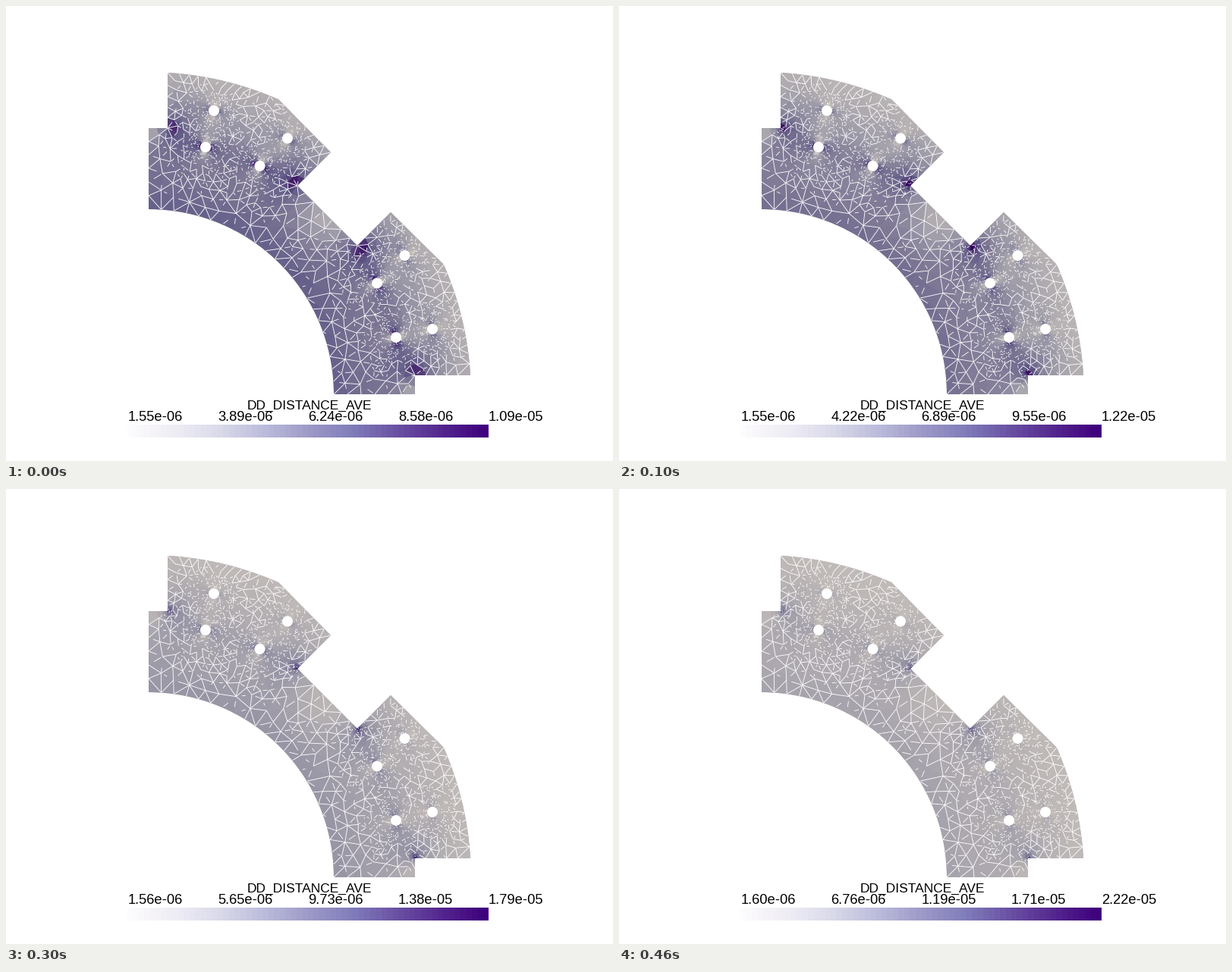
Write a matplotlib script that moves like this. It is 800x600 px and loops after 0.5 s.

```python
import numpy as np
import matplotlib.pyplot as plt
from matplotlib import colormaps
from matplotlib.animation import FuncAnimation
from matplotlib.collections import LineCollection, PolyCollection
from matplotlib.patches import Circle, PathPatch
from matplotlib.path import Path
from matplotlib.tri import Triangulation

W, H, DPI = 800, 600, 100
PX = 72 / DPI
CENTER = np.array([188.0, 512.0])
R_IN, R_OUT, R_HOLE = 244, 424.8, 7
RANGES = [(1.55, 10.925), (1.55, 12.222), (1.55, 14.925), (1.56, 17.905), (1.60, 22.24)]
SHADE = np.array([0.785, 0.766, 0.74])
CMAP = colormaps["Purples"].resampled(64)
rng = np.random.default_rng(5)

# Offsets from the centre (right, up) for one half; the other is its mirror.
HOLES = np.array([(86, 374), (183, 337.5), (75, 326), (146.5, 301)])
NOTCHES = np.array([(25, 351), (196, 275)])
PLUMES = np.array([(0.91, 0.41), (-0.41, 0.91)])
RING_R = 14


def to_screen(p):
    return CENTER + np.asarray(p) * (1, -1)


def both(p):
    return np.vstack([to_screen(p), to_screen(p[:, ::-1])])


hole_xy = both(HOLES)
notch_xy = both(NOTCHES)
ring_start = np.radians([-90, 45, 90, -45])


def arc(r, a, b):
    t = np.radians(np.linspace(a, b, 60))
    return to_screen(np.column_stack([r * np.cos(t), r * np.sin(t)]))


def line(a, b):
    return np.linspace(a, b, 60)


def make_pieces():
    lo = np.degrees(np.arctan2(25, 424))
    hi = np.degrees(np.arctan2(171, 389))
    half = [(171, 389), (240, 319), (196, 275)]
    chain = to_screen(half + [(y, x) for x, y in half[::-1]])
    foot = to_screen([(424, 25), (351, 25), (351, 0), (R_IN, 0)])
    head = to_screen([(0, R_IN), (0, 351), (25, 351), (25, 424)])
    segs = lambda pts: [line(a, b) for a, b in zip(pts, pts[1:])]
    return ([arc(R_OUT, 90 - lo, 90 - hi)] + segs(chain) + [arc(R_OUT, hi, lo)]
            + segs(foot) + [arc(R_IN, 0, 90)] + segs(head))


pieces = make_pieces()
outline = Path(np.vstack(pieces))


def dist(p, q):
    return np.hypot(*(p[:, None] - q[None]).transpose(2, 0, 1))


def cell_size(p):
    gap = dist(p, hole_xy).min(axis=1) - R_HOLE
    return np.clip(2.8 + 0.2 * gap, 2.8, 17)


def inside(p, margin=0.0):
    return outline.contains_points(p) & (dist(p, hole_xy).min(axis=1) > R_HOLE + margin)


def spread(piece):
    """Nodes along a curve, spaced by the local cell size."""
    step = np.hypot(*np.diff(piece, axis=0).T)
    mid = (piece[1:] + piece[:-1]) / 2
    s = np.r_[0, np.cumsum(step / cell_size(mid))]
    n = max(1, round(s[-1]))
    t = np.linspace(0, s[-1], n + 1)[:-1]
    return np.column_stack([np.interp(t, s, piece[:, i]) for i in (0, 1)])


def rings(r):
    t = ring_start[:, None] + np.linspace(0, 1.5 * np.pi, 8)
    xy = np.stack([np.cos(t), np.sin(t)], axis=-1)
    return (notch_xy[:, None] + r * xy).reshape(-1, 2)


def triangulate(pts):
    tri = Triangulation(pts[:, 0], pts[:, 1])
    tri.set_mask(~inside(pts[tri.triangles].mean(axis=1), -0.3))
    return tri


def inner_edges(tri):
    """Each edge shared by two cells, once."""
    i, j = np.nonzero(tri.neighbors > np.arange(len(tri.triangles))[:, None])
    return np.column_stack([tri.triangles[i, j], tri.triangles[i, (j + 1) % 3]])


def base_nodes():
    edge = np.vstack([spread(p) for p in pieces])
    near = dist(edge, notch_xy).min(axis=1)
    edge = edge[(near > 20) | (near < 0.5)]
    t = np.linspace(0, 2 * np.pi, 17)[:-1]
    rim = np.column_stack([np.cos(t), np.sin(t)]) * R_HOLE
    fixed = np.vstack([edge, rings(RING_R)] + [c + rim for c in hole_xy])

    cand = rng.uniform((188, 88), (612, 512), (200000, 2))
    cand = cand[outline.contains_points(cand)]
    size = cell_size(cand)
    keep = rng.random(len(cand)) < (2.8 / size) ** 2
    cand, size = cand[keep], size[keep]
    keep = inside(cand, 1) & (dist(cand, notch_xy).min(axis=1) > RING_R + 6)
    cand, size = cand[keep], size[keep]

    nodes = np.empty((len(fixed) + len(cand), 2))
    n = n_fixed = len(fixed)
    nodes[:n] = fixed
    for p, h in zip(cand, size):
        d = nodes[:n] - p
        if (d * d).sum(axis=1).min() > (0.76 * h) ** 2:
            nodes[n] = p
            n += 1
    nodes = nodes[:n]

    # Even out the inner nodes.
    for _ in range(4):
        a, b = triangulate(nodes).edges.T
        total, count = np.zeros_like(nodes), np.zeros(n)
        for i, j in ((a, b), (b, a)):
            np.add.at(total, i, nodes[j])
            np.add.at(count, i, 1)
        mean = total / np.maximum(count, 1)[:, None]
        free = (np.arange(n) >= n_fixed) & (count > 0)
        nodes[free] = mean[free]
    return nodes


def field(p):
    u = np.sort((p - CENTER) * (1, -1), axis=1)
    r = np.hypot(*u.T)
    v = np.interp(r, [244, 270, 300, 330, 360, 390, 425],
                  [7.5, 6.7, 6.1, 5.6, 4.6, 3.8, 3.1])
    for spot, amp, width in (((235.5, 235.5), 2.4, 40), ((0, 351), 2.3, 22)):
        v -= amp * np.exp(-((u - spot) ** 2).sum(axis=1) / width ** 2)
    # Holes: high at the tangential sides, low at the radial ones.
    for c, amp in zip(HOLES, (2.9, 2.9, 4.6, 4.6)):
        d = u - c
        rho = np.maximum(np.hypot(*d.T), R_HOLE)
        along = d @ (c / np.hypot(*c)) / rho
        v += amp * (R_HOLE / rho) ** 1.7 * (1 - 2 * along ** 2)
    # Re-entrant corners: singular peaks.
    for c, way in zip(NOTCHES, PLUMES):
        d = u - c
        rho = np.maximum(np.hypot(*d.T), 0.3)
        side = 0.7 + 0.3 * (d @ way) / rho
        v += 5.6 * (8.8 / rho) ** 0.45 * np.exp(-rho / 40) * side
    return np.maximum(v, 1.55)


def noise(p, k):
    return np.modf(np.abs(np.sin(p @ (12.99 + k, 78.23 - k)) * 4375.85))[0]


def cracks(pts, edges):
    """White seams, many of them broken."""
    a, b = pts[edges[:, 0]], pts[edges[:, 1]]
    swap = (a[:, 0] > b[:, 0])[:, None]
    a, b = np.where(swap, b, a), np.where(swap, a, b)
    mid, length = (a + b) / 2, np.hypot(*(b - a).T)
    full = (noise(mid, 0) < 0.62) & (length > 9)
    part = np.where(full, 1, 0.2 + 0.45 * noise(mid, 1))
    start = (1 - part) * noise(mid, 2)
    keep = noise(mid, 3) < np.clip(length / 14, 0.2, 0.95)
    p = a + (b - a) * start[:, None]
    q = a + (b - a) * (start + part)[:, None]
    return np.stack([p, q], axis=1)[keep]


def build():
    nodes, out = base_nodes(), []
    for level, (low, high) in enumerate(RANGES):
        if level:
            nodes = np.vstack([nodes, rings(RING_R / 2 ** level)])
        tri = triangulate(nodes)
        cells = nodes[tri.get_masked_triangles()]
        t = (field(cells.mean(axis=1)) - low) / (high - low)
        color = CMAP(np.clip(t, 0, 1))
        color[:, :3] *= SHADE
        out.append((cells, color, cracks(nodes, inner_edges(tri))))
    return out


meshes = build()

fig = plt.figure(figsize=(W / DPI, H / DPI), dpi=DPI, facecolor="white")
ax = fig.add_axes([0, 0, 1, 1])
ax.imshow(np.arange(64)[None], cmap=CMAP, extent=(160, 636, 569, 552),
          aspect="auto", interpolation="nearest")
ax.set_xlim(0, W)
ax.set_ylim(H, 0)
ax.axis("off")

body = PathPatch(outline, facecolor=SHADE * 0.9, edgecolor="none", zorder=1)
ax.add_patch(body)
faces = PolyCollection([], edgecolors="none", antialiaseds=False, zorder=2)
seams = LineCollection([], colors="white", linewidths=0.85 * PX,
                       capstyle="butt", zorder=3)
for art in (faces, seams):
    ax.add_collection(art, autolim=False)
    art.set_clip_path(body)
for c in hole_xy:
    ax.add_patch(Circle(c, R_HOLE, facecolor="white", edgecolor="none", zorder=4))


def label(x, y, size, text=""):
    return ax.text(x, y, text, ha="center", va="baseline", color="black",
                   family="Liberation Sans", fontsize=size * PX, zorder=5)


label(400, 532, 17.4, "DD_DISTANCE_AVE")
ticks = [label(197 + 118.75 * i, 547, 18.4) for i in range(5)]


def update(i):
    cells, color, segs = meshes[i]
    faces.set_verts(cells)
    faces.set_facecolor(color)
    seams.set_segments(segs)
    for tick, v in zip(ticks, np.linspace(*RANGES[i], 5)):
        tick.set_text(f"{v * 1e-6:.2e}")
    return [faces, seams, *ticks]


anim = FuncAnimation(fig, update, frames=len(RANGES), interval=100,
                     repeat=True, repeat_delay=0, blit=False)
plt.show()
```
